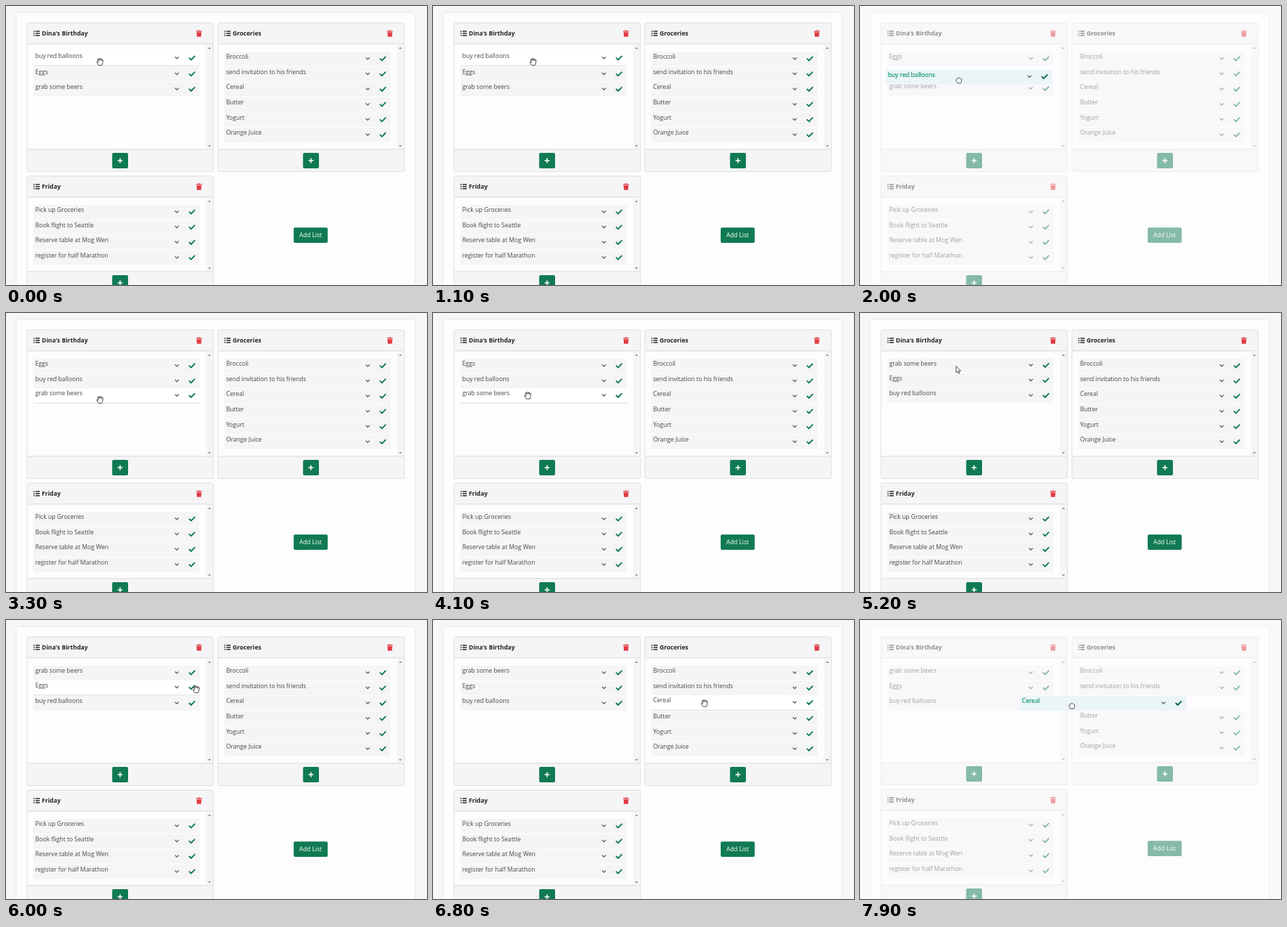
Write an HTML page that moves like this. It is 600x397 px and loops after 8 s.

```html
<!DOCTYPE html>
<html lang="en">
<head>
<meta charset="utf-8">
<title>Task lists</title>
<style>
  html, body { margin: 0; width: 100%; height: 100%; overflow: hidden; background: #fdfcfe; }
  svg { display: block; width: 600px; height: 397px; user-select: none; }
  text { font: 8.65px "Open Sans", "Noto Sans", sans-serif; fill: #45454a; }
  .title { font-weight: 700; fill: #252529; }
  .btn { fill: #107a53; }
  .btn-text { fill: #fff; }
  .edge { stroke: #dfdee2; stroke-width: 1; }
  .bar { fill: #f5f4f6; }
  .body { fill: #fdfcfe; }
  .arrow { fill: #8d8d92; }
  .trash { fill: #e03c44; }
  .icon { stroke: #252529; stroke-width: 1.3; }
  .line { fill: none; stroke-linecap: round; stroke-linejoin: round; }
  .chev { stroke: #66666c; stroke-width: 1.4; }
  .check { stroke: #107a53; stroke-width: 1.9; }
  .plus { stroke: #fff; stroke-width: 1.6; }
  .bg { fill: #f5f4f6; }
  .under { fill: none; }
  .hover .bg { fill: #fff; }
  .hover .under { fill: #dcdbdf; }
  .drag .bg { fill: #ebf5f7; }
  .drag text { fill: #12936b; stroke: #12936b; stroke-width: .2px; }
  .drag .check { stroke: #0a6646; }
  .cursor { fill: #fff; stroke: #222; stroke-width: .8; stroke-linejoin: round; }
</style>
</head>
<body>
<svg id="stage" viewBox="0 0 600 397">
  <defs>
    <filter id="soft" x="-5%" y="-5%" width="110%" height="110%">
      <feDropShadow dx="0" dy="0" stdDeviation="2.5" flood-color="#000" flood-opacity=".07"/>
    </filter>
  </defs>
  <g id="page">
    <rect width="600" height="397" fill="#f7f6f8"/>
    <rect x="15.5" y="10" width="566.5" height="420" rx="2" fill="#fdfcfe" filter="url(#soft)"/>
  </g>
  <g id="top"></g>
  <g id="pointer" class="cursor">
    <path id="tip" d="M0 0V9.4L2.1 7.5L3.6 10.7L5.1 10L3.7 6.9H6.5Z"/>
    <path id="open" d="M-2 5.3L-4.6 1.6Q-5 .2-3.6 .3L-2.5 1.5L-3.5-2.6Q-3.3-4-2.3-3.3L-1.6-1.4L-1.5-4Q-.8-5.4 0-4L.3-1.6L1-3.9Q2-4.8 2.4-3.4L2.2-.9L3.2-2.4Q4.5-2.7 4.3-1.2L3.5 3L2.6 5.3Z"/>
    <path id="fist" d="M-2 4.2L-4 1.2Q-4.5-.5-3.2-.7Q-3.4-2.8-1.8-2.7Q-.8-3.8.3-2.9Q1.6-3.4 2.2-2.3Q4-2.3 3.8-.3Q3.8 2 2.6 4.2Z"/>
  </g>
</svg>
<script>
const $ = id => document.getElementById(id);
const page = $('page'), topLayer = $('top');
const LOOP = 8000, PITCH = 21.65, ROW_W = 237, ROW_H = 20.5;

function add(parent, tag, attrs = {}, text) {
  const el = document.createElementNS('http://www.w3.org/2000/svg', tag);
  for (const k in attrs) el.setAttribute(k, attrs[k]);
  if (text) el.textContent = text;
  parent.append(el);
  return el;
}
const rect = (p, cls, x, y, width, height, rx = 0) =>
  add(p, 'rect', { class: cls, x, y, width, height, rx });
const path = (p, cls, d) => add(p, 'path', { class: cls, d });
const label = (p, cls, x, y, s) => add(p, 'text', { class: cls, x, y }, s);
const move = (el, x, y) => el.setAttribute('transform', `translate(${x} ${y})`);

function makeRow(parent, text, x, y, slot) {
  const el = add(parent, 'g');
  rect(el, 'under', 0, 1, ROW_W, ROW_H, 1);
  rect(el, 'bg', 0, 0, ROW_W, ROW_H, 1);
  label(el, '', 2.7, 10.2, text);
  path(el, 'line chev', 'M202.2 8.7l2.3 2.3l2.3-2.3');
  path(el, 'line check', 'M222.3 10.2l2.5 2.5l5-5.2');
  return { el, parent, x, y, slot };
}

function makeCard(parent, x, y, bodyH, title, items) {
  const bottom = y + 30 + bodyH, w = 265.5;
  rect(parent, 'bar edge', x, y, w, 30, 2);
  rect(parent, 'body edge', x, y + 30, w, bodyH);
  rect(parent, 'bar', x + 255, y + 30.5, 10, bodyH - 1);
  path(parent, 'arrow', `M${x + 257.8} ${y + 37}h4.4l-2.2-2.6z`);
  for (let i = -1; i < 2; i++)
    path(parent, 'icon', `M${x + 9.2} ${y + 15 + i * 3}h1.6m1.3 0h6`);
  label(parent, 'title', x + 21, y + 18.2, title);
  path(parent, 'trash', `M${x + 241} ${y + 11.3}h2.4l.6-.9h2.2l.6.9h2.4v1.2h-8.2zM${x + 241.6} ${y + 13.2}h7l-.5 6.6h-6z`);

  const foot = add(parent, 'g');
  rect(foot, 'bar edge', x, bottom, w, 31.5, 2);
  path(foot, 'arrow', `M${x + 257.8} ${bottom - 6}h4.4l-2.2 2.6z`);
  rect(foot, 'btn', x + 121.3, bottom + 5, 22.7, 22, 2);
  path(foot, 'line plus', `M${x + 129.6} ${bottom + 16}h6m-3-3v6`);
  const rows = items.map((s, i) => makeRow(parent, s, x + 9, y + 41, i));
  return { foot, rows };
}

const left = makeCard(page, 30, 24, 150, "Dina's Birthday",
  ['buy red balloons', 'Eggs', 'grab some beers']);
const right = makeCard(page, 302, 24, 150, 'Groceries',
  ['Broccoli', 'send invitation to his friends', 'Cereal', 'Butter', 'Yogurt', 'Orange Juice']);
const lower = add(page, 'g');
const friday = makeCard(lower, 30, 242, 106, 'Friday',
  ['Pick up Groceries', 'Book flight to Seattle', 'Reserve table at Mog Wen', 'register for half Marathon']);
rect(lower, 'btn', 410, 315.3, 48.5, 21.7, 2);
label(lower, 'btn-text', 418, 329.4, 'Add List');

const [balloons, eggs, beers] = left.rows;
const cereal = right.rows[2];
const allRows = [...left.rows, ...right.rows, ...friday.rows];

// Slot changes: [time, new slot]
balloons.shifts = [[1500, 1], [4400, 2]];
eggs.shifts = [[1500, 0], [4680, 1]];
beers.shifts = [[4400, 1], [4680, 0]];

const drags = [
  { row: balloons, list: left, start: 1200, end: 2010 },
  { row: beers, list: left, start: 4250, end: 5020 },
  { row: cereal, list: right, start: 7300, end: 9000 }
];
const SETTLE = 300;

const cursorKeys = [
  [0, 134, 79], [700, 134, 79], [1150, 143, 79], [1200, 143, 79], [1800, 141, 105.5],
  [2400, 141, 105.5], [3100, 134, 123], [3900, 134, 123], [4250, 136, 113],
  [4600, 140, 88], [5000, 137, 75.5], [5450, 137, 75.5], [6500, 387, 118],
  [6850, 387, 118], [7100, 385, 121], [7300, 385, 121], [7900, 302, 122]
];

const clamp = v => Math.max(0, Math.min(1, v));
const smooth = v => { v = clamp(v); return v * v * (3 - 2 * v); };
const easeOut = v => 1 - (1 - clamp(v)) ** 3;

function cursorAt(t) {
  let i = 0;
  while (i < cursorKeys.length - 2 && t >= cursorKeys[i + 1][0]) i++;
  const [t0, x0, y0] = cursorKeys[i], [t1, x1, y1] = cursorKeys[i + 1];
  const k = smooth((t - t0) / (t1 - t0));
  return [x0 + (x1 - x0) * k, y0 + (y1 - y0) * k];
}

function slotAt(row, t, animated = true) {
  let slot = row.slot;
  for (const [at, next] of row.shifts || [])
    if (t >= at) slot += (next - slot) * (animated ? smooth((t - at) / 200) : 1);
  return slot;
}

function dragPos(d, t) {
  const [x, y] = cursorAt(t), [gx, gy] = cursorAt(d.start);
  const home = d.row.y + slotAt(d.row, d.start) * PITCH - 1;
  return [d.row.x + x - gx, home + y - gy];
}

function render(t) {
  const [cx, cy] = cursorAt(t);
  const active = drags.find(d => t >= d.start && t < d.end + SETTLE);
  const held = active && t < active.end;
  const drop = held && active.list === right ? -1 : 0;
  const slotNow = active && slotAt(active.row, t, false);
  let hovering = false;

  for (const row of allRows) {
    const own = active && active.row === row;
    const slot = slotAt(row, t);
    let x = row.x, y = row.y + slot * PITCH;
    if (active && active.list.rows.includes(row) && slot >= slotNow - .01) y -= 1;
    const over = !active && cx > x && cx < x + ROW_W && cy > y && cy < y + PITCH;
    if (over) { y -= 1; hovering = true; }
    if (own) {
      const [dx, dy] = dragPos(active, Math.min(t, active.end));
      const k = held ? 0 : easeOut((t - active.end) / SETTLE);
      x = dx + (x - dx) * k;
      y = dy + (y - dy) * k;
    }
    const layer = own ? topLayer : row.parent;
    if (row.el.parentNode !== layer) layer.append(row.el);
    row.el.setAttribute('class', own && held ? 'drag' : over ? 'hover' : '');
    move(row.el, x, y);
  }

  for (const el of [left.foot, right.foot, lower]) move(el, 0, drop);
  page.setAttribute('opacity', held ? 1 - .5 * clamp((t - active.start) / 200) : 1);

  move($('pointer'), cx, cy);
  const shape = held ? 'fist' : hovering ? 'open' : 'tip';
  for (const id of ['tip', 'open', 'fist'])
    $(id).setAttribute('visibility', id === shape ? 'visible' : 'hidden');
}

function tick() {
  render(performance.now() % LOOP);
  requestAnimationFrame(tick);
}
tick();
</script>
</body>
</html>
```
